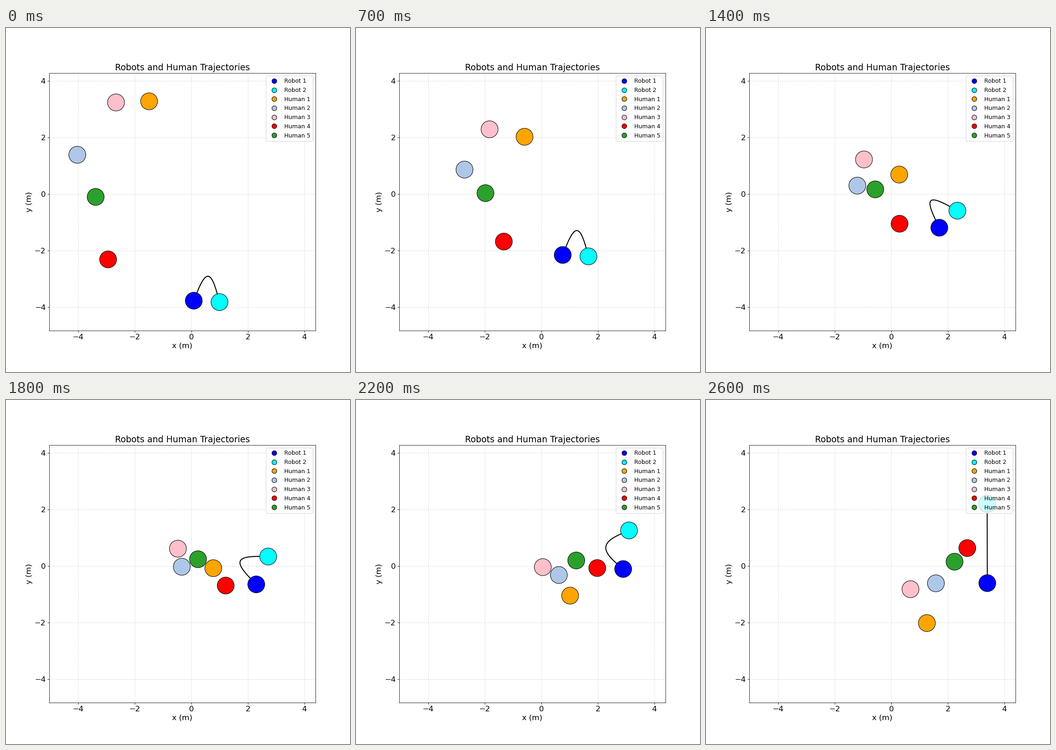
Write a matplotlib script that moves like this. It is 748 by 748 pixels and loops after 2.7 s.

```python
import numpy as np
import matplotlib.pyplot as plt
from matplotlib.animation import FuncAnimation
from matplotlib.lines import Line2D
from matplotlib.patches import Circle

FRAMES, INTERVAL = 27, 100
RADIUS = 0.3
FULL_PACE = 0.25     # metres per step
ROPE_LENGTH = 2.0


def walk(start, *legs):
    """Positions along straight legs of (steps, heading in degrees[, pace])."""
    path = [np.array(start)]
    for steps, heading, *pace in legs:
        angle = np.radians(heading)
        move = np.array([np.cos(angle), np.sin(angle)]) * (pace[0] if pace else FULL_PACE)
        for _ in range(steps):
            path.append(path[-1] + move)
    return np.array(path)


def rope_points(a, b):
    """Sine arch from a to b that flattens as the rope is pulled tight."""
    chord = b - a
    dist = np.hypot(*chord)
    height = np.sqrt(max(ROPE_LENGTH**2 - dist**2, 0)) / 2
    normal = np.array([-chord[1], chord[0]]) / dist
    s = np.linspace(0, 1, 100)[:, None]
    return a + s * chord + height * np.sin(np.pi * s) * normal


paths = {
    "Robot 1": walk((0.09, -3.77), (7, 67.5), (4, 22.5, 0.177), (3, 67.5),
                    (8, 42.2, 0.202), (2, 0), (2, -90)),
    "Robot 2": walk((1.0, -3.82), (25, 67.5), (1, 90)),
    "Human 1": walk((-1.49, 3.28), (2, -47, 0.204), (16, -56.9, 0.228), (8, -76.1)),
    "Human 2": walk((-4.03, 1.39), (2, -27, 0.132), (16, -20.5, 0.231), (8, -17)),
    "Human 3": walk((-2.66, 3.24), (2, -41, 0.143), (19, -51, 0.196), (5, -51.3)),
    "Human 4": walk((-2.94, -2.31), (19, 21.3, 0.248), (7, 44.9)),
    "Human 5": walk((-3.38, -0.1), (18, 5.4, 0.202), (8, -2.5)),
}
colors = ["blue", "cyan", "orange", "#aec7e8", "pink", "red", "#2ca02c"]

fig, ax = plt.subplots(figsize=(10, 10), dpi=74.8)
everywhere = np.concatenate(list(paths.values()))
low, high = everywhere.min(axis=0) - 1, everywhere.max(axis=0) + 1
ax.set_aspect("equal")
ax.set_xlim(low[0], high[0])
ax.set_ylim(low[1], high[1])
ax.set_xticks(range(-4, 5, 2))
ax.set_yticks(range(-4, 5, 2))
ax.tick_params(labelsize=16)
ax.set_xlabel("x (m)", fontsize=16)
ax.set_ylabel("y (m)", fontsize=16)
ax.set_title("Robots and Human Trajectories", fontsize=18)
ax.grid(True, linestyle="--", alpha=0.5)

rope, = ax.plot([], [], color="black", lw=2, zorder=2)
bodies = {}
handles = []
for name, color in zip(paths, colors):
    bodies[name] = ax.add_patch(Circle((0, 0), RADIUS, facecolor=color,
                                       edgecolor="black", zorder=3))
    handles.append(Line2D([], [], linestyle="", marker="o", markersize=10,
                          markerfacecolor=color, markeredgecolor="black", label=name))
ax.legend(handles=handles, loc="upper right", fontsize=12, labelspacing=0.54)


def update(step):
    for name, body in bodies.items():
        body.center = paths[name][step]
    rope.set_data(*rope_points(paths["Robot 1"][step], paths["Robot 2"][step]).T)
    return [rope, *bodies.values()]


anim = FuncAnimation(fig, update, frames=FRAMES, interval=INTERVAL,
                     repeat=True, repeat_delay=0)
plt.show()
```
